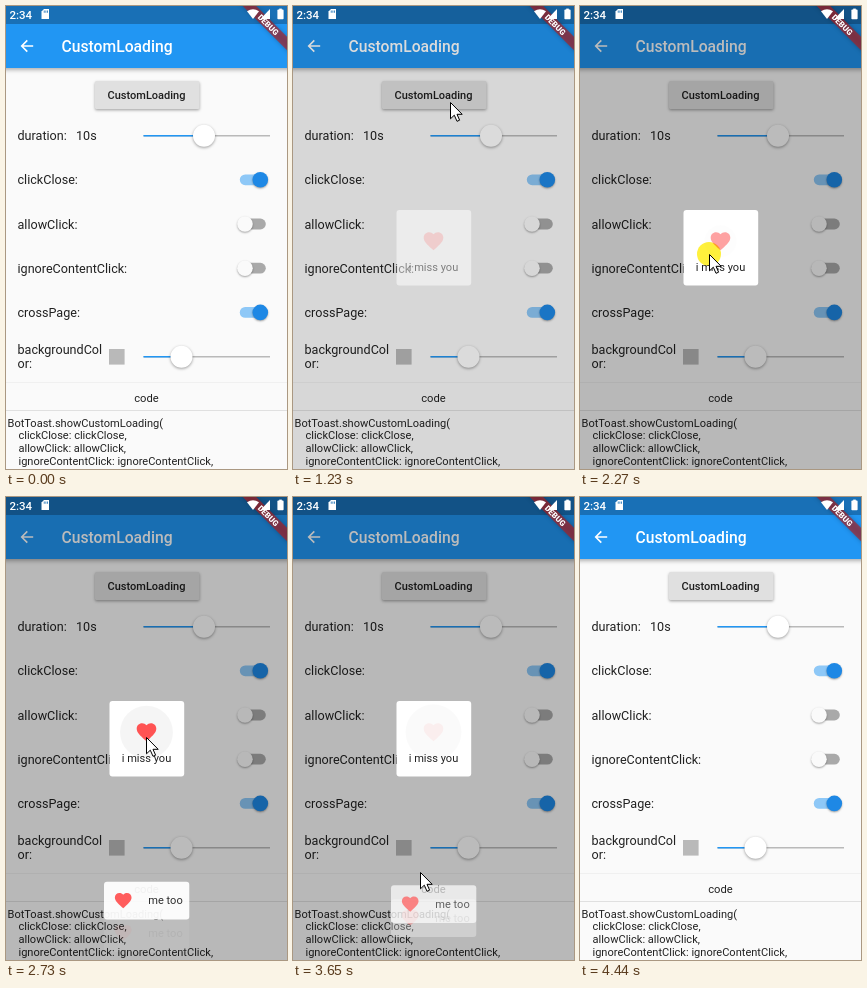
An HTML page with a canvas that plays this animation: 281 by 463 pixels, repeating every 5060 ms.

```html
<!DOCTYPE html>
<html lang="en">
<head>
<meta charset="utf-8">
<title>CustomLoading</title>
<style>
html, body { margin: 0; width: 100%; height: 100%; overflow: hidden; background: #fafafa; }
canvas { display: block; width: 281px; height: 463px; }
</style>
</head>
<body>
<canvas id="stage"></canvas>
<script>
const W = 281, H = 463, LOOP = 5060;
const BLUE = '#2196f3', RED = '#ff5252', INK = 'rgba(0,0,0,0.87)';
const canvas = document.getElementById('stage');
const ctx = canvas.getContext('2d');
const dpr = window.devicePixelRatio || 1;
canvas.width = W * dpr;
canvas.height = H * dpr;

const HEART = new Path2D('M12 21.35l-1.45-1.32C5.4 15.36 2 12.28 2 8.5 2 5.42 4.42 3 7.5 3c1.74 0 3.41.81 4.5 2.09C13.09 3.81 14.76 3 16.5 3 19.58 3 22 5.42 22 8.5c0 3.78-3.4 6.86-8.55 11.54L12 21.35z');
const ARROW = new Path2D('M0.5 0.5V16.8L4.3 13.2L7 19.3L9.6 18.2L7 12.3H12.2Z');

// Timeline in ms
const FADE = 290, SLIDE = 256, PULSE = 300;
const dialogs = [[520, 1095], [1830, 3960]];
const taps = [2335, 2715, 3095, 3475];
const presses = [[430, 515], [1010, 1095], [1655, 1810],
  ...taps.map(t => [t - 82, t]), [3875, 3960]];
const pointer = [
  [30, 190, 463], [400, 157, 96], [1450, 157, 96], [1500, 156, 96],
  [1850, 156, 96], [2200, 129, 248], [2340, 129, 248], [2600, 140, 240],
  [3475, 140, 240], [3650, 127, 375], [4000, 127, 375], [4390, 187, 446], [4440, 189, 463]
];

const clamp = v => Math.max(0, Math.min(1, v));
const smooth = p => p * p * (3 - 2 * p);

function presence(t, [start, end], span) {
  return t < end ? clamp((t - start) / span) : clamp(1 - (t - end) / span);
}

function pointerAt(t) {
  const i = pointer.findIndex(k => k[0] > t);
  const [t0, x0, y0] = pointer[i - 1], [t1, x1, y1] = pointer[i];
  const p = smooth((t - t0) / (t1 - t0));
  return [x0 + (x1 - x0) * p, y0 + (y1 - y0) * p];
}

function rect(x, y, w, h, r, fill) {
  ctx.beginPath();
  ctx.roundRect(x, y, w, h, r);
  ctx.fillStyle = fill;
  ctx.fill();
}

function disc(x, y, r, fill) {
  ctx.beginPath();
  ctx.arc(x, y, r, 0, Math.PI * 2);
  ctx.fillStyle = fill;
  ctx.fill();
}

function poly(points, fill) {
  ctx.beginPath();
  points.forEach(([x, y]) => ctx.lineTo(x, y));
  ctx.closePath();
  ctx.fillStyle = fill;
  ctx.fill();
}

function text(str, x, y, size, fill = INK, weight = 400, align = 'left') {
  ctx.font = `${weight} ${size}px Roboto, sans-serif`;
  ctx.textAlign = align;
  ctx.fillStyle = fill;
  ctx.fillText(str, x, y);
}

function shadowed(blur, dy, alpha, draw) {
  ctx.save();
  ctx.shadowColor = `rgba(0,0,0,${alpha})`;
  ctx.shadowBlur = blur * dpr;
  ctx.shadowOffsetY = dy * dpr;
  draw();
  ctx.restore();
}

function heart(x, y, size, alpha) {
  ctx.save();
  ctx.globalAlpha = alpha;
  ctx.translate(x, y);
  ctx.scale(size / 24, size / 24);
  ctx.translate(-12, -12.2);
  ctx.fillStyle = RED;
  ctx.fill(HEART);
  ctx.restore();
}

function slider(x, y) {
  rect(137.5, y - 0.8, 126.5, 1.6, 0, '#b9b9b9');
  rect(137.5, y - 0.8, x - 137.5, 1.6, 0, BLUE);
  shadowed(3, 1, 0.38, () => disc(x, y, 11, '#fff'));
}

function toggle(y, on) {
  rect(233.8, y - 5.4, 26, 10.8, 5.4, on ? 'rgba(33,150,243,0.5)' : 'rgba(0,0,0,0.32)');
  shadowed(2, 1, 0.35, () => disc(on ? 254.3 : 239, y, 7.8, on ? '#1e88e5' : '#fafafa'));
}

function drawPage() {
  rect(0, 0, W, H, 0, '#fafafa');
  shadowed(4, 1.5, 0.3, () => rect(-5, 0, W + 10, 62, 0, BLUE));
  rect(0, 0, W, 18, 0, '#1970b6');

  ctx.strokeStyle = '#fff';
  ctx.lineWidth = 1.6;
  ctx.beginPath();
  ctx.moveTo(27.2, 40);
  ctx.lineTo(16, 40);
  ctx.moveTo(21.3, 34.4);
  ctx.lineTo(15.7, 40);
  ctx.lineTo(21.3, 45.6);
  ctx.stroke();
  text('CustomLoading', 55.5, 46, 15.7, '#fff', 500);

  shadowed(3, 1.3, 0.35, () => rect(89, 75, 104.5, 28, 1.6, '#e0e0e0'));
  text('CustomLoading', 140.5, 93, 11, INK, 500, 'center');

  text('duration:', 11.5, 134.3, 12.6);
  text('10s', 70, 134.3, 12.6);
  slider(198, 129.8);
  [['clickClose:', true], ['allowClick:', false], ['ignoreContentClick:', false], ['crossPage:', true]]
    .forEach(([label, on], i) => {
      const y = 173.8 + i * 44.2;
      text(label, 11.5, y + 4.5, 12.6);
      toggle(y, on);
    });
  text('backgroundCol', 11.5, 347.5, 12.6);
  text('or:', 11.5, 362.3, 12.6);
  rect(103, 343, 15.6, 15.6, 0, '#b9b9b9');
  slider(175.5, 350.8);

  rect(0, 376, W, 1, 0, '#f0f0f0');
  text('code', 140.5, 395.7, 11.2, INK, 400, 'center');
  rect(0, 404, W, 1, 0, '#e0e0e0');
  ['BotToast.showCustomLoading(', '    clickClose: clickClose,', '    allowClick: allowClick,',
    '    ignoreContentClick: ignoreContentClick,']
    .forEach((line, i) => text(line, 1.5, 420.7 + i * 12.7, 11.05));
}

function drawRipple(t, alpha) {
  for (const tap of taps) {
    const down = clamp((t - tap + 82) / 110);
    const a = t < tap ? down : clamp(1 - (t - tap) / 340);
    if (down && a) disc(140.5, 235.3, 14 + 14 * down, `rgba(0,0,0,${0.04 * a * alpha})`);
  }
}

function drawDialog(t, span) {
  const v = presence(t, span, FADE);
  if (!v) return;
  rect(0, 0, W, H, 0, `rgba(0,0,0,${0.265 * v})`);
  rect(103.5, 204, 74.7, 75.5, 3, `rgba(255,255,255,${v})`);
  drawRipple(t, v);
  const beat = 1 - Math.abs(((t - span[0]) / PULSE) % 2 - 1);
  heart(140.5, 235.3, 23.5, beat * v);
  text('i miss you', 140.5, 265, 11.05, `rgba(0,0,0,${0.87 * v})`, 400, 'center');
}

function drawToast(t, span) {
  const v = presence(t, span, SLIDE);
  if (!v) return;
  ctx.save();
  ctx.translate(0, 37 * (1 - v) ** 2);
  rect(98, 384.7, 85.3, 37.7, 3, `rgba(255,255,255,${v})`);
  heart(117.2, 403.5, 20, v);
  text('me too', 142.3, 407.3, 11.05, `rgba(0,0,0,${0.87 * v})`);
  ctx.restore();
}

function drawBanner() {
  ctx.save();
  ctx.beginPath();
  ctx.rect(0, 0, W, H);
  ctx.clip();
  ctx.translate(W, 0);
  ctx.rotate(Math.PI / 4);
  shadowed(4, 0, 0.4, () => rect(-40, 21.8, 80, 9.5, 0, 'rgba(183,28,28,0.63)'));
  text('DEBUG', 0, 29.4, 8, '#fff', 900, 'center');
  ctx.restore();
}

function drawStatus() {
  text('2:34', 3.5, 13, 11.5, '#fff', 500);
  poly([[38, 3], [43, 3], [43, 13], [35.5, 13], [35.5, 5.5]], '#fff');
  for (const x of [38.2, 39.9, 41.4]) rect(x - 0.4, 4.5, 0.8, 2.2, 0, '#1970b6');
  ctx.beginPath();
  ctx.moveTo(247, 13);
  ctx.lineTo(241, 5.2);
  ctx.quadraticCurveTo(247, 1.2, 253, 5.2);
  ctx.closePath();
  ctx.fillStyle = '#fff';
  ctx.fill();
  poly([[264, 3], [264, 13], [254.5, 13]], '#fff');
  rect(273.2, 2.6, 2.6, 2, 0, '#fff');
  rect(271.4, 3.6, 6.2, 9.6, 0.8, '#fff');
}

function drawPointer(t) {
  if (t < 30 || t >= 4440) return;
  const [x, y] = pointerAt(t);
  ctx.save();
  if (presses.some(([a, b]) => t >= a && t < b)) {
    ctx.globalCompositeOperation = 'multiply';
    disc(x, y, 12, '#fff13c');
    ctx.globalCompositeOperation = 'source-over';
  }
  ctx.translate(x, y);
  ctx.fillStyle = '#fff';
  ctx.strokeStyle = '#000';
  ctx.lineWidth = 1;
  ctx.fill(ARROW);
  ctx.stroke(ARROW);
  ctx.restore();
}

function render(now) {
  const t = now % LOOP;
  ctx.setTransform(dpr, 0, 0, dpr, 0, 0);
  drawPage();
  dialogs.forEach(span => drawDialog(t, span));
  taps.forEach((tap, i) => drawToast(t, [tap, taps[i + 1] || 3960]));
  drawBanner();
  drawStatus();
  drawPointer(t);
}

const start = performance.now();
function tick() {
  render(performance.now() - start);
  requestAnimationFrame(tick);
}
tick();
</script>
</body>
</html>
```
